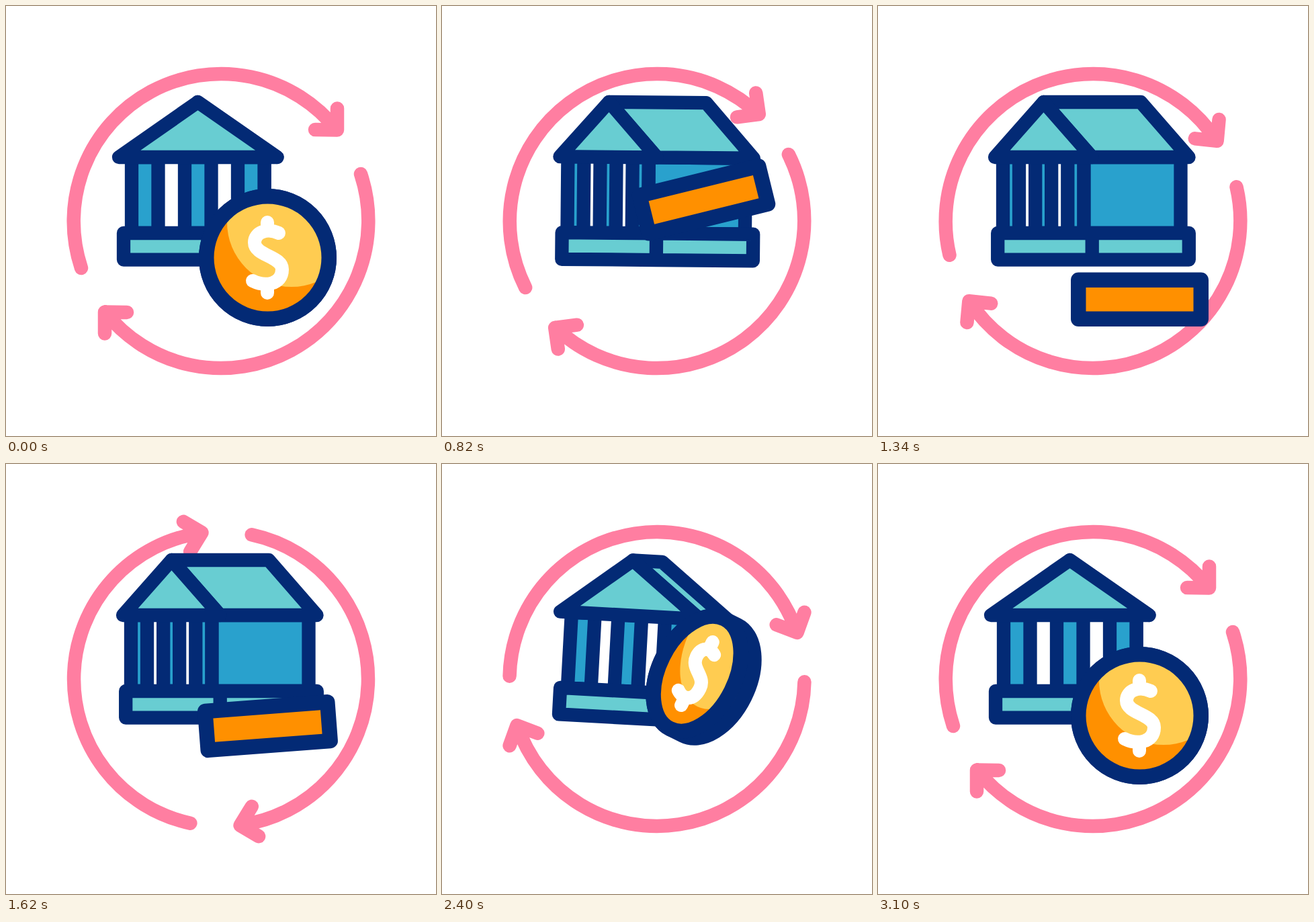
An HTML page that plays this animation: 640 px wide and 640 px high, repeating every 3300 ms.

```html
<!DOCTYPE html>
<html lang="en">
<head>
<meta charset="utf-8">
<title>Bank and coin</title>
<style>
  html, body { margin: 0; width: 100%; height: 100%; overflow: hidden; background: #fff; }
  svg { display: block; width: 100%; height: 100%; }
  .line { stroke-linecap: round; stroke-linejoin: round; }
  .fixed { vector-effect: non-scaling-stroke; }
</style>
</head>
<body>
<svg viewBox="0 0 640 640">
  <defs>
    <clipPath id="disc"><circle r="91.25"/></clipPath>
    <g id="arrow">
      <path d="M112 390A219.5 219.5 0 0 1 492.5 184.5M493 152.5V184.5L460 184"/>
    </g>
  </defs>

  <g id="ring" class="line" fill="none" stroke="#ff7ea1" stroke-width="20.5">
    <use href="#arrow"/>
    <use href="#arrow" transform="rotate(180 320 320)"/>
  </g>

  <g id="bank" class="line" stroke="#032a75" stroke-width="20.3">
    <g stroke-linecap="butt" fill="#29a1cd">
      <path id="wall" style="stroke-linecap:butt"/>
      <path id="columns" style="stroke-linecap:butt"/>
    </g>
    <g fill="#68cdd2">
      <path id="base"/>
      <path id="roof"/>
      <path id="gable"/>
    </g>
  </g>

  <g id="coin" class="line" stroke="#032a75" stroke-width="22.5">
    <path id="body" fill="#ff9000"/>
    <g id="face">
      <g clip-path="url(#disc)" stroke="none">
        <circle r="91.25" fill="#ff9000"/>
        <circle cx="35.5" cy="-52.5" r="96" fill="#ffcc51"/>
      </g>
      <circle class="fixed" r="91.25" fill="none"/>
      <path id="dollar" class="fixed" fill="none" stroke="#fff"
        d="M16.5-36.5C-1.5-44.5-19.5-37.5-19.5-22.5C-19.5-2.5 21.5-2.5 21.5 17.5C21.5 40.5-4.5 43.5-22.5 34.5M-.5-52.5V-40M-.5 52.5V40"/>
    </g>
  </g>
</svg>

<script>
const LOOP = 3300, END = 3100;
const RADIUS = 91.25, THICKNESS = 58;
const el = Object.fromEntries([...document.querySelectorAll('[id]')].map(e => [e.id, e]));
const set = (name, attr, value) => el[name].setAttribute(attr, value);
const mix = (a, b, k) => a + (b - a) * k;

// Each track is a list of [time, value], eased in and out between entries.
const tracks = {
  spin: [[0, 0], [600, -35], [2040, 387], [3100, 360]],
  turn: [[0, 0], [600, 1], [2020, 1], [2620, 0]],
  lean: [[0, 0], [300, -2.9], [600, 3], [900, 0], [2040, 0], [2380, 3.2], [2680, -3], [2980, 0]],
  coinY: [[0, 374.5], [600, 222.5], [1200, 436.75], [1440, 436.75], [2040, 222.5], [2660, 374.5]],
  coinAngle: [[0, 0], [600, 70], [1200, 90], [1440, 90], [2040, 70], [2660, 0]],
  coinOpen: [[0, 1], [600, 0], [2040, 0], [2660, 1]]
};

function valueAt(track, t) {
  const next = track.findIndex(key => key[0] > t);
  if (next < 0) return track[track.length - 1][1];
  const [t0, a] = track[next - 1], [t1, b] = track[next];
  const k = (t - t0) / (t1 - t0);
  return mix(a, b, k * k * (3 - 2 * k));
}

function drawBank(turn, lean, pivotY) {
  const x = (front, side) => mix(front, side, turn);
  const box = (l, t, r, b) => `M${l} ${t}H${r}V${b}H${l}Z`;

  const corner = x(384.5, 306.3);
  set('wall', 'd', box(corner, 225, x(384.5, 450.5), 338));
  set('columns', 'd', [0, 1, 2].map(i =>
    box(x(187 + 79 * i, 186 + 48.15 * i), 225, x(226.5 + 79 * i, 210 + 48.15 * i), 338)).join(''));

  const baseMid = x(396, 318.7);
  set('base', 'd', box(x(175, 178.2), 338, baseMid, 377.6) + box(baseMid, 338, x(396, 462.8), 377.6));

  const apex = x(285.5, 246.5), gableRight = x(403.5, 318.5);
  set('roof', 'd', `M${apex} 143H${x(285.5, 391)}L${x(403.5, 462.5)} 225H${gableRight}Z`);
  set('gable', 'd', `M${x(168, 174)} 225L${apex} 143L${gableRight} 225Z`);
  set('bank', 'transform', `rotate(${lean} 270 ${pivotY})`);
}

function drawCoin(y, angle, open) {
  const half = THICKNESS * (1 - open) / 2, rx = RADIUS * open;
  const arc = `A${rx} ${RADIUS} 0 0 1 `;
  set('coin', 'transform', `translate(389.5 ${y}) rotate(${angle})`);
  set('body', 'd',
    `M${-half} ${-RADIUS}H${half}${arc}${half} ${RADIUS}H${-half}${arc}${-half} ${-RADIUS}Z`);
  set('face', 'visibility', open > 0.005 ? 'visible' : 'hidden');
  set('face', 'transform', `translate(${-half} 0) scale(${Math.max(open, 0.005)} 1)`);
  set('dollar', 'stroke-width', 20 * Math.min(1, open * 4));
}

function draw(time) {
  const t = Math.min(time % LOOP, END);
  const now = name => valueAt(tracks[name], t);
  set('ring', 'transform', `rotate(${now('spin')} 320 320)`);
  drawBank(now('turn'), now('lean'), t < 1500 ? 385 : 338);
  drawCoin(now('coinY'), now('coinAngle'), now('coinOpen'));
}

const start = performance.now();
function tick() {
  draw(performance.now() - start);
  requestAnimationFrame(tick);
}
tick();
</script>
</body>
</html>
```
